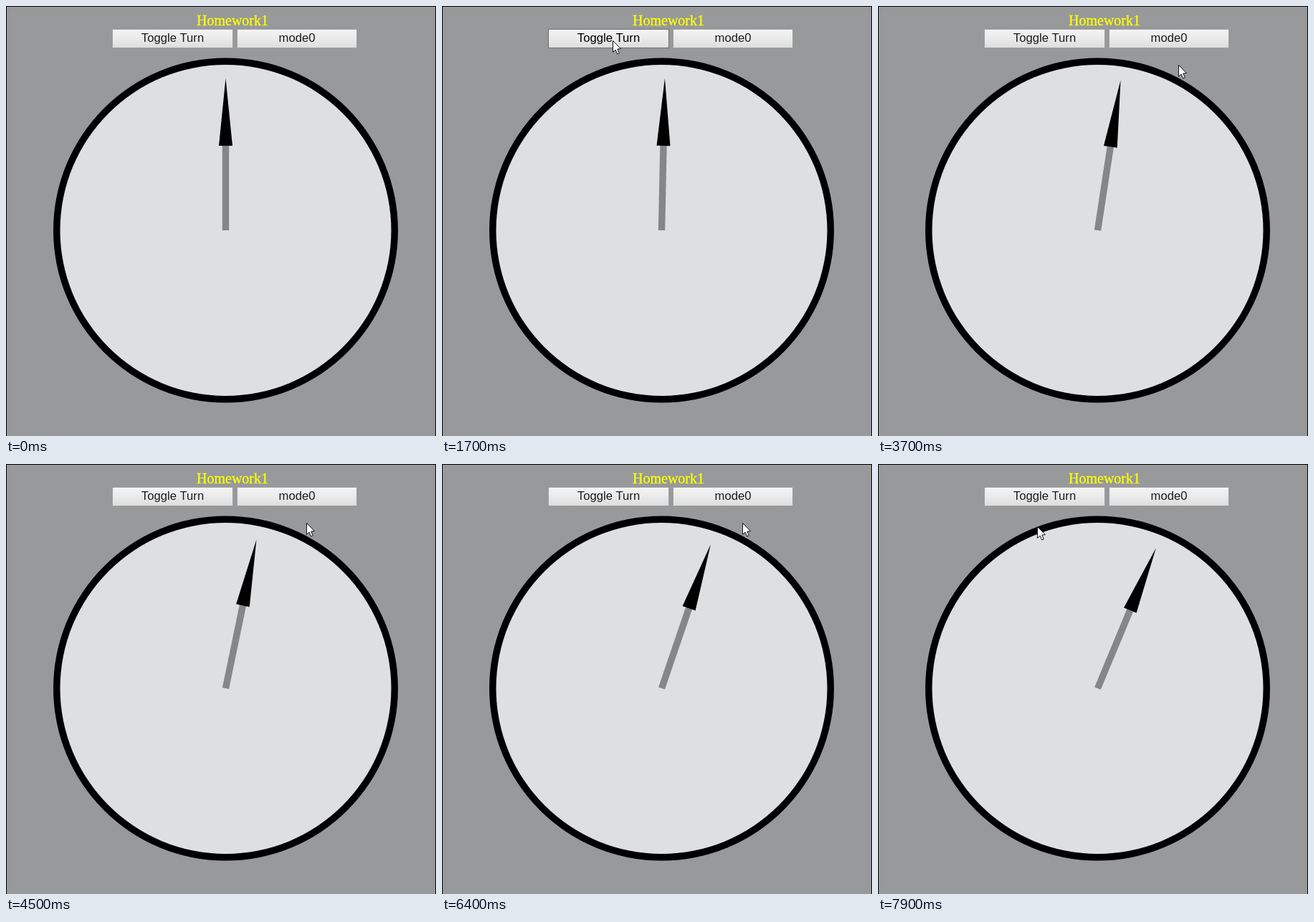
Recreate the animation shown at these times as an HTML page with a canvas. Size 600 by 600 pixels, loop 8000 ms.

```html
<!DOCTYPE html>
<html lang="en">
<head>
<meta charset="utf-8">
<title>Homework1</title>
<style>
  html, body { margin: 0; width: 100%; height: 100%; overflow: hidden; background: #97999b; }
  canvas { display: block; }
</style>
</head>
<body>
<canvas id="stage" width="600" height="600"></canvas>
<script>
const ctx = document.getElementById('stage').getContext('2d');
const LOOP = 8000, STEP = 100;
const CENTER = { x: 306.5, y: 313 };
const TURN_RATE = 3.75; // degrees per second
const TURN_START = 1380, TURN_END = 7400;
const PRESSES = [1300, 7300];

const ENTRY = { x: 538, y: 62 };
const TOGGLE = { x: 238, y: 48 };
const MOVES = [
  { from: 600, to: 1000, end: TOGGLE },
  { from: 2100, to: 2500, end: { x: 318, y: 80 } },
  { from: 2500, to: 3500, end: { x: 419, y: 82 } },
  { from: 6600, to: 7200, end: TOGGLE },
  { from: 7500, to: 7900, end: { x: 222, y: 87 } }
];

const clamp = (v, lo, hi) => Math.min(Math.max(v, lo), hi);
const smooth = k => k * k * (3 - 2 * k);

function pointerAt(t) {
  if (t < MOVES[0].from) return null;
  let { x, y } = ENTRY;
  for (const { from, to, end } of MOVES) {
    const k = smooth(clamp((t - from) / (to - from), 0, 1));
    x += (end.x - x) * k;
    y += (end.y - y) * k;
  }
  return { x: Math.round(x), y: Math.round(y) };
}

function disc(r, color) {
  ctx.fillStyle = color;
  ctx.beginPath();
  ctx.arc(CENTER.x, CENTER.y, r, 0, Math.PI * 2);
  ctx.fill();
}

function polygon(points, color) {
  ctx.fillStyle = color;
  ctx.beginPath();
  points.forEach(([x, y]) => ctx.lineTo(x, y));
  ctx.closePath();
  ctx.fill();
}

function label(text, x, y, font, color) {
  ctx.font = font;
  ctx.fillStyle = color;
  ctx.textAlign = 'center';
  ctx.fillText(text, x, y);
}

function title() {
  label('Homework1', 316, 27, '20px "Liberation Serif", "Times New Roman", serif', '#ff0');
  ctx.strokeStyle = '#ff0';
  ctx.lineWidth = 0.3;
  ctx.strokeText('Homework1', 316, 27);
}

function button(text, x, w, pointer, pressed) {
  const y = 33, h = 25;
  const hover = pointer && pointer.x >= x && pointer.x < x + w && pointer.y >= y && pointer.y < y + h;
  const down = hover && pressed;
  ctx.fillStyle = hover ? '#6c6d6e' : '#9fa0a1';
  ctx.fillRect(x - 1, y - 1, w + 2, h + 2);

  const fill = ctx.createLinearGradient(0, y, 0, y + h);
  fill.addColorStop(0, down ? '#e7e7e7' : '#f4f4f4');
  fill.addColorStop(0.4, down ? '#e4e4e4' : '#ececec');
  fill.addColorStop(1, down ? '#d7d7d7' : '#dedede');
  ctx.fillStyle = fill;
  ctx.fillRect(x, y, w, h);
  label(text, x + w / 2, 50, '16.67px "Liberation Sans", Arial, sans-serif', hover ? '#000' : '#1c1c1c');
}

function needle(degrees) {
  ctx.save();
  ctx.translate(CENTER.x, CENTER.y);
  ctx.rotate(degrees * Math.PI / 180);
  ctx.fillStyle = '#868687';
  ctx.fillRect(-4.7, -119, 9.4, 119);
  polygon([[0, -212], [9.5, -118], [-9.5, -118]], '#000');
  ctx.restore();
}

function arrow({ x, y }) {
  ctx.save();
  ctx.translate(x + 0.5, y + 0.5);
  polygon([[0, 0], [0, 16], [3.6, 12.6], [6.2, 18.5], [8.8, 17.4], [6.3, 11.6], [11, 11.2]], '#fff');
  ctx.strokeStyle = '#111';
  ctx.lineWidth = 1;
  ctx.stroke();
  ctx.restore();
}

function draw(t) {
  const pointer = pointerAt(t);
  const pressed = PRESSES.includes(t);
  const turned = (clamp(t, TURN_START, TURN_END) - TURN_START) / 1000;

  ctx.fillStyle = '#000';
  ctx.fillRect(0, 0, 600, 600);
  ctx.fillStyle = '#97999b';
  ctx.fillRect(1, 1, 598, 599);

  title();
  button('Toggle Turn', 149, 167, pointer, pressed);
  button('mode0', 323, 166, pointer, pressed);

  disc(240.5, '#000');
  disc(231, '#dedfe1');
  needle(turned * TURN_RATE);
  if (pointer) arrow(pointer);
}

const start = performance.now();
function tick() {
  const elapsed = (performance.now() - start) % LOOP;
  draw(Math.floor(elapsed / STEP) * STEP);
  requestAnimationFrame(tick);
}
tick();
</script>
</body>
</html>
```
